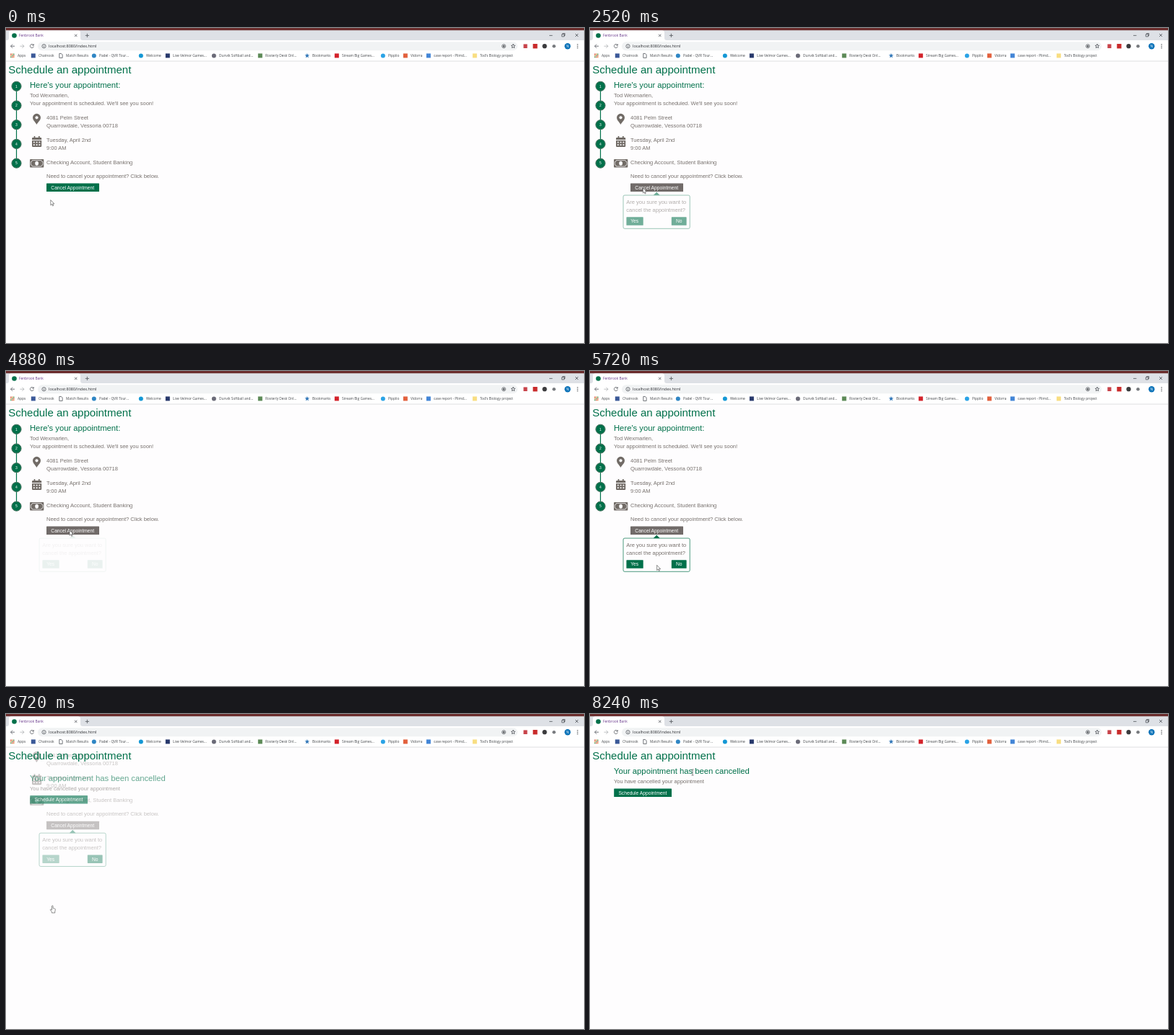
An HTML page for the animation above (8280 ms loop, 800x437 px).

```html
<!DOCTYPE html>
<html lang="en">
<head>
<meta charset="utf-8">
<title>Schedule an appointment</title>
<style>
  html, body { margin: 0; width: 100%; height: 100%; overflow: hidden; background: #fefdfe; }
  svg { display: block; width: 800px; height: 437px; }
  .page { font-family: "Liberation Sans", Arial, sans-serif; font-size: 7.5px; fill: #77716d; }
  .page .title { font-size: 15px; }
  .page .heading { font-size: 11.25px; }
  .page .label { font-size: 6.7px; fill: #fff; }
  .page .step { font-size: 5px; fill: #fff; text-anchor: middle; }
  .green { fill: #00704a; }
  .icon { fill: #716b66; }
  .ui { font-family: "Open Sans", "Noto Sans", sans-serif; font-size: 4.8px; fill: #45484c; }
  .line { fill: none; stroke: #50545a; stroke-width: .8; }
</style>
</head>
<body>
<svg viewBox="0 0 800 437">
  <defs>
    <clipPath id="viewport"><rect y="46" width="800" height="391"/></clipPath>
  </defs>
  <rect width="800" height="437" fill="#fefdfe"/>

  <g class="page" clip-path="url(#viewport)">
    <g id="steps"></g>
    <g id="booked">
      <text class="heading green" x="33" y="83.2">Here's your appointment:</text>
      <text x="33" y="96">Tod Wexmarlen,</text>
      <text x="33" y="107.2">Your appointment is scheduled. We'll see you soon!</text>
      <path class="icon" fill-rule="evenodd" d="M42.4 134C41 131 37 128 37 124.3A5.5 5.5 0 0 1 48 124.3C48 128 44 131 42.4 134ZM42.5 122.2a2.1 2.1 0 1 0 .01 0Z"/>
      <text x="56" y="127">4081 Pelm Street</text>
      <text x="56" y="138">Quarrowdale, Vessoria 00718</text>
      <g id="calendar" class="icon">
        <path d="M36 155V153.2Q36 152 37.2 152H38.6V150H40.4V152H44.9V150H46.7V152H48Q49.2 152 49.2 153.2V155Z"/>
        <path d="M36 156H49.2V163.7Q49.2 165 48 165H37.2Q36 165 36 163.7Z"/>
      </g>
      <text x="56" y="158">Tuesday, April 2nd</text>
      <text x="56" y="169">9:00 AM</text>
      <rect class="icon" x="33" y="182" width="19.3" height="11.5" rx="1"/>
      <path fill="none" stroke="#fefdfe" stroke-width=".7" d="M36.5 183.5H48.8Q49 185.5 51 185.7V189.8Q49 190 48.8 192H36.5Q36.3 190 34.3 189.8V185.7Q36.3 185.5 36.5 183.5Z"/>
      <ellipse cx="42.6" cy="187.8" rx="2.4" ry="3" fill="#fefdfe"/>
      <text x="56" y="188.8">Checking Account, Student Banking</text>
      <text x="56" y="208.3">Need to cancel your appointment? Click below.</text>
      <rect id="cancel" x="56" y="215.5" width="73" height="11.5" rx=".6"/>
      <text class="label" x="62.3" y="223.6">Cancel Appointment</text>
      <g id="popover">
        <rect x="46" y="232" width="92.2" height="46.3" rx="2" fill="#fefdfe" stroke="#00704a" stroke-width=".7"/>
        <path class="green" d="M87.8 232L92.2 227.6L96.6 232Z"/>
        <text x="50.3" y="243.5">Are you sure you want to</text>
        <text x="50.3" y="254.8">cancel the appointment?</text>
        <g id="yes"><rect class="green" x="50.4" y="262.3" width="23.3" height="11.5" rx=".6"/><text class="label" x="56.2" y="270.4">Yes</text></g>
        <g id="no"><rect class="green" x="112.8" y="262.3" width="20.8" height="11.5" rx=".6"/><text class="label" x="118.9" y="270.4">No</text></g>
      </g>
    </g>
    <g id="cancelled">
      <text class="heading green" x="33" y="83.2">Your appointment has been cancelled</text>
      <text x="33" y="96">You have cancelled your appointment</text>
      <rect id="again" x="33.2" y="103.5" width="79.8" height="11.5" rx=".6"/>
      <text class="label" x="39.4" y="111.6">Schedule Appointment</text>
    </g>
    <text class="title green" x="3.2" y="63">Schedule an appointment</text>
  </g>

  <g id="browser" class="ui">
    <rect width="800" height="46" fill="#fff"/>
    <rect y="3" width="800" height="14" fill="#dee1e6"/>
    <rect width="800" height="3.2" fill="#6b2d2d"/>
    <path fill="#fff" d="M1 17Q4 17 4 14V6.5Q4 3.6 7 3.6H100Q103 3.6 103 6.5V14Q103 17 106 17Z"/>
    <circle cx="11.5" cy="10.5" r="3.3" class="green"/>
    <text x="18" y="12.2" fill="#6a3a8c">Fenbrook Bank</text>
    <path class="line" d="M95 8.7l3.4 3.4m0-3.4l-3.4 3.4M112.4 7.8v5.2m-2.6-2.6h5.2"/>
    <path class="line" d="M752 10.4h4.4M769.3 8.7h3.2v3.2h-3.2ZM770.4 8.6v-1.1h3.2v3.2h-1M788 8l4 4m0-4l-4 4"/>
    <rect x="44" y="19.3" width="664" height="12" rx="6" fill="#f1f3f4"/>
    <path class="line" d="M12 25.2H6.6m2.5-2.6L6.5 25.2l2.6 2.6"/>
    <path class="line" stroke-opacity=".45" d="M19.4 25.2h5.4m-2.5-2.6l2.6 2.6l-2.6 2.6"/>
    <path class="line" d="M37.9 23.6a2.5 2.5 0 1 0 .4 2M38.3 22.2v1.9h-1.9"/>
    <circle class="line" cx="52.5" cy="25.2" r="2.6"/>
    <path class="line" d="M52.5 24.8v1.8m0-3v.6"/>
    <text x="59" y="27" font-size="5.5" fill="#303236">localhost:8080/index.html</text>
    <circle class="line" cx="689" cy="25.2" r="2.5"/><circle cx="689" cy="25.2" r="1.2"/>
    <path id="favorite" class="line"/>
    <rect x="716.3" y="22.4" width="5.2" height="5.6" fill="#c8434a"/>
    <rect x="729.3" y="22" width="6.2" height="6.4" fill="#c92b2b"/>
    <circle cx="745.5" cy="25.2" r="3.1" fill="#3b3b3d"/>
    <circle cx="758.5" cy="25.2" r="2.3" fill="#777a7e"/>
    <circle cx="777.3" cy="25.2" r="4.2" fill="#0a72b8"/>
    <text x="777.3" y="27" text-anchor="middle" style="fill:#fff">N</text>
    <path d="M790.5 22.3h1.2v1.2h-1.2Zm0 2.4h1.2v1.2h-1.2Zm0 2.4h1.2v1.2h-1.2Z"/>
    <path d="M0 46H800" stroke="#d6d7da" stroke-width=".8"/>
  </g>

  <g id="cursor" stroke="#444" stroke-width=".6" stroke-linejoin="round" fill="#fff">
    <path id="arrow" d="M0 0V7.2L1.7 5.7L2.8 8.2L3.9 7.7L2.8 5.3H5Z"/>
    <path id="hand" d="M-.8 .8Q0-.4 .8 .8V4L3.4 4.6Q4.2 5 4 6.2L3.4 8.6V10.4H-.9V9L-3 6.3Q-3 5-1.7 5.6L-.8 6.4Z"/>
    <path id="beam" fill="none" d="M-1.5-4H1.5M0-4V4M-1.5 4H1.5"/>
  </g>
</svg>
<script>
const LOOP = 8280, STEP = 40, SWAP = 6480;
const GREEN = "#00704a", GRAY = "#716b69";
const $ = id => document.getElementById(id);

function add(parent, tag, attrs, text = "") {
  const node = document.createElementNS("http://www.w3.org/2000/svg", tag);
  for (const key in attrs) node.setAttribute(key, attrs[key]);
  node.textContent = text;
  return parent.appendChild(node);
}

function star(cx, cy, r) {
  const points = Array.from({ length: 10 }, (_, i) => {
    const a = (i / 5 - .5) * Math.PI, q = i % 2 ? r * .45 : r;
    return `${(cx + q * Math.cos(a)).toFixed(2)} ${(cy + q * Math.sin(a)).toFixed(2)}`;
  });
  return `M${points.join("L")}Z`;
}

// Bookmarks: text x, label, icon shape, icon colour
const bookmarks = [
  [16, "Apps", "grid"],
  [45, "Chatnook", "square", "#3b5998"],
  [83, "Match Results", "doc"],
  [129, "Padel - QVR Tour...", "circle", "#2f86c4"],
  [194, "Welcome", "circle", "#1498d5"],
  [231, "Live Velmor Games...", "square", "#27386b"],
  [295, "Dunvik Softball and...", "circle", "#6b6b78"],
  [359, "Rosterly Desk Onl...", "square", "#5d8a57"],
  [424, "Bookmarks", "star", "#3277b8"],
  [465, "Stream Big Games...", "square", "#d3222a"],
  [529, "Pipplio", "circle", "#2aa3e6"],
  [560, "Vidorra", "square", "#e2603c"],
  [592, "case report - Plimd...", "square", "#4285d6"],
  [656, "Tod's Biology project", "square", "#f8de82"]
];

function drawBookmarks() {
  const bar = $("browser");
  for (const [x, label, shape, fill] of bookmarks) {
    const cx = x - 7.2, cy = 38.4;
    if (shape === "grid") {
      const colors = ["#d94b3d", "#e08a3c", "#4a9a55"];
      for (let i = 0; i < 9; i++)
        add(bar, "rect", { x: cx - 2.8 + i % 3 * 2, y: cy - 2.8 + Math.floor(i / 3) * 2, width: 1.5, height: 1.5, fill: colors[(i + Math.floor(i / 3)) % 3] });
    } else if (shape === "doc") {
      add(bar, "path", { class: "line", d: `M${cx - 2} ${cy - 3}h2.6l1.7 1.7v4.3h-4.3Z` });
    } else if (shape === "star") {
      add(bar, "path", { d: star(cx, cy, 3.4), fill });
    } else if (shape === "circle") {
      add(bar, "circle", { cx, cy, r: 3, fill });
    } else {
      add(bar, "rect", { x: cx - 3, y: cy - 3, width: 6, height: 6, fill });
    }
    add(bar, "text", { x, y: 40.2 }, label);
  }
}

function drawSteps() {
  const steps = $("steps");
  add(steps, "path", { d: "M14.5 81V187", stroke: GREEN, "stroke-width": 1.2 });
  for (let i = 0; i < 5; i++) {
    const cy = 80.8 + i * 26.7;
    add(steps, "circle", { cx: 14.5, cy, r: 6.6, fill: GREEN, stroke: "#4f7563", "stroke-width": 1 });
    add(steps, "text", { class: "step", x: 14.5, y: cy + 1.8 }, i + 1);
  }
}

function drawCalendarDays() {
  for (let i = 0; i < 6; i++)
    add($("calendar"), "rect", { x: 37.9 + i % 3 * 3.8, y: 157.6 + Math.floor(i / 3) * 3.6, width: 1.8, height: 1.8, fill: "#fefdfe" });
}

// Pointer path: time, x, y
const path = [
  [0, 61.8, 238.6], [640, 72, 223], [1280, 72, 223], [1400, 76, 224],
  [1760, 76, 224], [1800, 73.3, 221.8], [2640, 73.3, 221.8], [3040, 64, 224],
  [3720, 124.3, 270.3], [4240, 124.3, 270.3], [4720, 88, 221], [5240, 88, 221],
  [5680, 92.5, 268.8], [5720, 92.6, 269.3], [5920, 92.6, 269.3], [6320, 64.3, 265.5],
  [6760, 64.3, 265.5], [7040, 66.2, 222.8], [7600, 76, 121], [8240, 142, 81]
];

const clamp = v => Math.min(1, Math.max(0, v));
const ramp = (t, start, length) => clamp((t - start) / length);
const show = (id, on) => $(id).setAttribute("visibility", on ? "visible" : "hidden");
const set = (id, name, value) => $(id).setAttribute(name, value);

function pointerAt(t) {
  const next = path.findIndex(key => key[0] > t);
  if (next < 0) return path[path.length - 1].slice(1);
  const [t0, x0, y0] = path[next - 1], [t1, x1, y1] = path[next];
  const u = (t - t0) / (t1 - t0), e = u * u * (3 - 2 * u);
  return [x0 + (x1 - x0) * e, y0 + (y1 - y0) * e];
}

function popoverOpacity(t) {
  if (t < 3960) return ramp(t, 2220, 540);
  if (t < 4880) return 1 - ramp(t, 3860, 500);
  return ramp(t, 4840, 540);
}

function render(t) {
  const [x, y] = pointerAt(t);
  const over = (left, top, right, bottom) => x >= left && x <= right && y >= top && y <= bottom;
  const swapped = t >= SWAP;
  const progress = 1 - (1 - ramp(t, SWAP, 650)) ** 2;
  const popover = popoverOpacity(t);
  const open = popover > 0 && !swapped;

  const focused = (t >= 2240 && t < 3960) || t >= 4880;
  const overYes = open && over(50, 262, 74, 274) || swapped;
  const overNo = open && over(112.5, 262, 134, 274);
  set("cancel", "fill", focused || over(56, 215, 129, 227) ? GRAY : GREEN);
  set("again", "fill", over(33, 103, 113, 115) ? GRAY : GREEN);
  set("yes", "opacity", overYes ? .7 : 1);
  set("no", "opacity", overNo ? .7 : 1);
  set("popover", "opacity", popover);

  show("steps", !swapped);
  set("booked", "opacity", 1 - progress);
  set("booked", "transform", `translate(0 ${-111 * progress})`);
  set("cancelled", "opacity", progress);
  set("cancelled", "transform", `translate(0 ${24 * (1 - progress)})`);

  const hand = overNo || (overYes && t < 6800);
  const overText = swapped
    ? over(33, 73, 221, 86) || over(33, 89, 158, 98)
    : open && over(50, 236, 133, 257);
  set("cursor", "transform", `translate(${x} ${y})`);
  show("hand", hand);
  show("beam", overText && !hand);
  show("arrow", !overText && !hand);
}

drawBookmarks();
drawSteps();
drawCalendarDays();
set("favorite", "d", star(702, 25.2, 3));

const began = performance.now();
function tick() {
  const t = (performance.now() - began) % LOOP;
  render(Math.floor(t / STEP) * STEP);
  requestAnimationFrame(tick);
}
tick();
</script>
</body>
</html>
```
